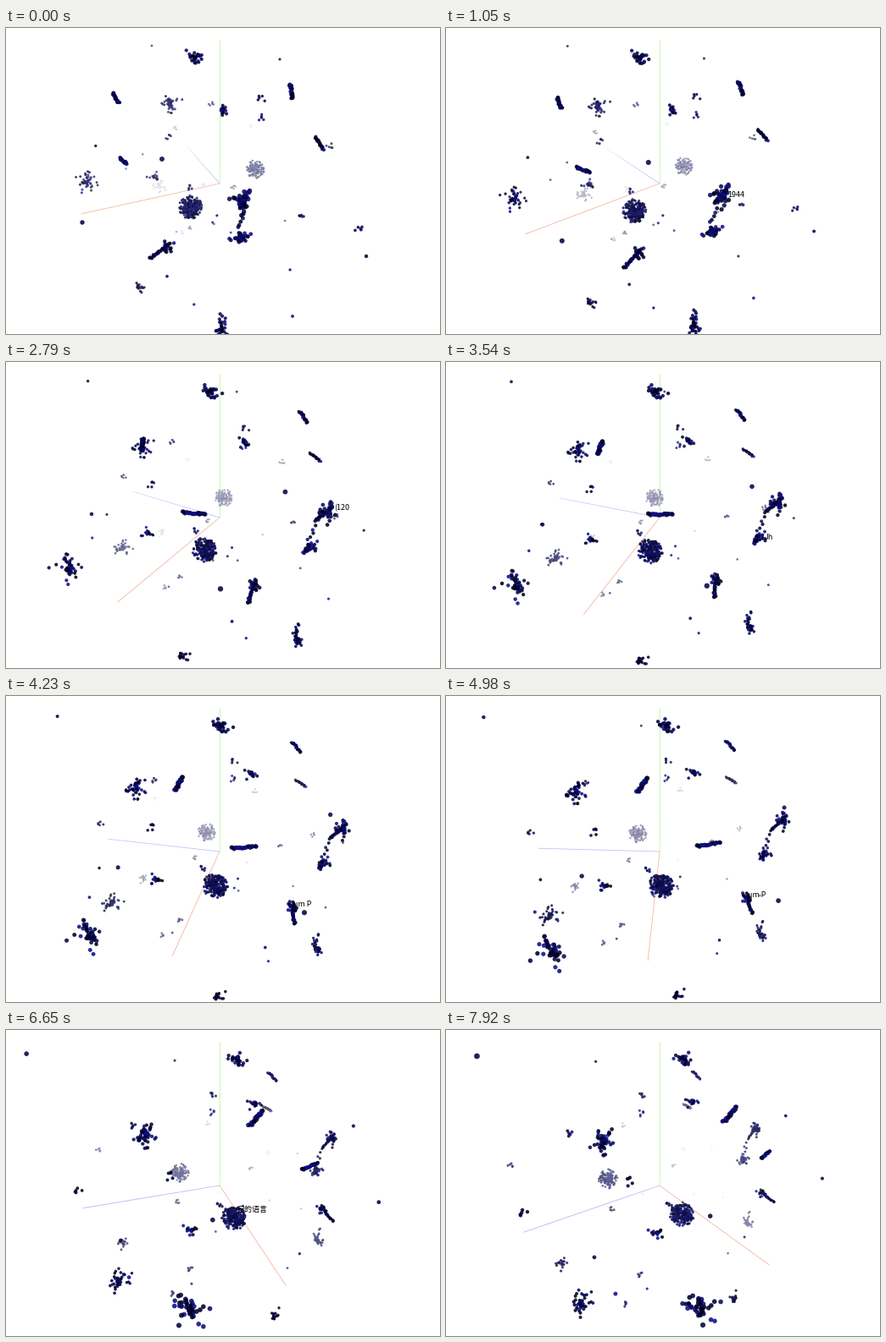
These frames come from a looping animation (512x362 px, 8000 ms). A matplotlib script:

```python
import numpy as np
import matplotlib.pyplot as plt
from matplotlib.animation import FuncAnimation
from matplotlib.collections import LineCollection

W, H, DPI = 512, 362, 64
PX = 72 / DPI                      # points per pixel
FRAMES, INTERVAL = 200, 40
CX, CY, SCALE = 252, 184, 147
TILT, PERSPECTIVE = np.radians(30), 0.5
START, END = 0, 7920               # times of the two key poses, ms

# The orbit pauses in these spans, then jumps ahead.
PAUSES = [(0, 110), (1050, 1270), (5460, 5610), (6070, 6350), (6400, 6650)]

rng = np.random.default_rng(4)


def basis(t):
    """Rows: screen right, screen up, scaled closeness to the camera."""
    a = np.radians(-66.3 + 12.7 * t / 1000)
    right = np.array([np.cos(a), 0, np.sin(a)])
    front = np.array([-np.sin(a), 0, np.cos(a)])
    up = np.array([0, 1, 0])
    c, s = np.cos(TILT), np.sin(TILT)
    return np.array([right, c * up - s * front,
                     PERSPECTIVE * (c * front + s * up)])


def project(points, t):
    r, u, d = basis(t) @ np.asarray(points, float).T
    w = 1 - d
    return CX + SCALE * r / w, CY - SCALE * u / w, w


def locate(x0, y0, x1):
    """3D point seen at (x0, y0) at START and in column x1 at END."""
    right, up, near = basis(START)
    right_end, _, near_end = basis(END)
    u, v, u_end = (x0 - CX) / SCALE, (CY - y0) / SCALE, (x1 - CX) / SCALE
    rows = [right + u * near, up + v * near, right_end + u_end * near_end]
    return np.linalg.solve(np.array(rows), np.array([u, v, u_end]))


def directions(n):
    d = rng.normal(size=(n, 3))
    return d / np.linalg.norm(d, axis=1, keepdims=True)


def ball(center, n, radius):
    return center + directions(n) * radius / SCALE * rng.random((n, 1)) ** 0.4


def worm(p, q, n, jitter=0.5):
    k = np.linspace(0, 1, n)[:, None]
    return p + (q - p) * k + rng.normal(size=(n, 3)) * jitter / SCALE


def star(center, arms, n, radius):
    """Clump of short knobbly arms."""
    tips = center + directions(arms) * radius / SCALE
    return np.concatenate([worm(center, tip, n, 1.3) for tip in tips])


# Landmarks: x and y at START, x at END.
CORE = locate(218, 212, 278)
HALO = locate(294, 167, 191)
HOOK = locate(280, 206, 368)
KNOT = locate(276, 246, 351)
FOOT = locate(254, 355, 355)
TAIL = locate(190, 257, 373)
CROWN = locate(222, 37, 282)
CLOSE = [locate(*p) for p in ((194, 87, 184), (95, 183, 300), (181, 188, 158))]
LOOSE = [locate(*p) for p in ((232, 186, 135), (156, 306, 339),
                              (175, 176, 246), (256, 96, 291))]
TUFTS = [locate(*p) for p in (
    (243, 90, 148), (302, 83, 232), (301, 107, 230), (382, 140, 210),
    (200, 119, 92), (192, 129, 215), (268, 189, 196), (218, 189, 262),
    (208, 242, 211), (218, 236, 227), (416, 239, 281), (350, 222, 268),
    (288, 115, 77))]
SPECKS = [locate(*p) for p in ((172, 21, 36), (184, 155, 401), (90, 230, 444),
                               (323, 37, 177), (425, 270, 314),
                               (338, 341, 327))]
WORMS = [(locate(*p), locate(*q)) for p, q in (
    ((335, 66, 291), (338, 84, 300)), ((126, 77, 342), (133, 89, 327)),
    ((365, 129, 281), (374, 143, 289)), ((134, 154, 372), (143, 161, 381)),
    ((190, 257, 373), (170, 273, 387)), ((283, 199, 368), (277, 213, 357)))]
STEM = np.array([0, 0.14, 0])

parts = [ball(CORE, 210, 13.5), ball(HALO, 120, 13), np.array(SPECKS),
         ball(np.zeros(3), 12, SCALE)]
parts += [star(c, 9, 5, 12) for c in CLOSE]
parts += [star(c, 5, 6, 8) for c in (CROWN, HOOK, KNOT, FOOT)]
parts += [star(c, 4, 4, 7) for c in LOOSE]
parts += [star(TAIL, 4, 4, 5)]
parts += [ball(c, 5, 4.5) for c in TUFTS]
parts += [worm(p, q, 20) for p, q in WORMS]
parts += [worm(c, c + STEM, 7, 0.8) for c in (KNOT, FOOT)]
CLOUD = np.concatenate(parts)

shade = rng.random((len(CLOUD), 1)) ** 1.5
INK = np.array([0, 0, 0.12]) + shade * np.array([0.06, 0.06, 0.46])

# Text, end of its span, anchor, offset in pixels; the first starts at 600 ms.
LABELS_FROM = 600
LABELS = [("1944", 1600, HOOK, (4, -2)), ("(120", 2800, HOOK, (4, -5)),
          ("Jh", 4200, KNOT, (8, 0)), ("um P", 5700, TAIL, (1, -1)),
          ("己的语言", 7300, CORE, (4, -10))]

AXES = [((0, 0, 1), (0.95, 0.7, 0.6)),
        ((0, 1, 0), (0.74, 0.95, 0.62)),
        ((-1, 0, 0), (0.68, 0.71, 0.96))]


def fog(w):
    return np.clip((w - 0.85) / 0.55, 0, 0.95) ** 1.5


fig = plt.figure(figsize=(W / DPI, H / DPI), dpi=DPI, facecolor="white")
ax = fig.add_axes([0, 0, 1, 1])
ax.set(xlim=(0, W), ylim=(H, 0))
ax.axis("off")
lines = LineCollection([], linewidths=0.8 * PX, zorder=2)
ax.add_collection(lines)
dots = ax.scatter(*np.zeros((2, len(CLOUD))), s=1, linewidths=0, zorder=3)
label = ax.text(0, 0, "", fontsize=9 * PX, color="black", va="center",
                family="Noto Sans CJK JP", zorder=4)


def draw_axes(t):
    segments, colors = [], []
    for tip, color in AXES:
        x, y, w = project(np.outer(np.linspace(0, 1, 13), tip), t)
        xy = np.column_stack([x, y])
        segments += list(np.stack([xy[:-1], xy[1:]], axis=1))
        f = fog((w[:-1] + w[1:]) / 2)[:, None]
        colors += list(np.array(color) * (1 - f) + f)
    lines.set_segments(segments)
    lines.set_color(colors)


def draw_cloud(t):
    x, y, w = project(CLOUD, t)
    order = np.argsort(-w)
    f = fog(w)[:, None]
    rgba = np.column_stack([INK * (1 - f) + f, np.full(len(w), 0.88)])
    dots.set_offsets(np.column_stack([x, y])[order])
    dots.set_sizes((3 / w[order] * PX) ** 2)
    dots.set_facecolor(rgba[order])


def draw_label(t):
    label.set_text("")
    since = LABELS_FROM
    for text, until, anchor, (dx, dy) in LABELS:
        if since <= t < until:
            x, y, _ = project([anchor], t)
            label.set_text(text)
            label.set_position((x[0] + dx, y[0] + dy))
        since = until


def update(i):
    t = (i + 0.5) * INTERVAL
    for begin, end in PAUSES:
        if begin <= t < end:
            t = begin
    draw_axes(t)
    draw_cloud(t)
    draw_label(t)
    return lines, dots, label


anim = FuncAnimation(fig, update, frames=FRAMES, interval=INTERVAL,
                     repeat=True, repeat_delay=0)
plt.show()
```
